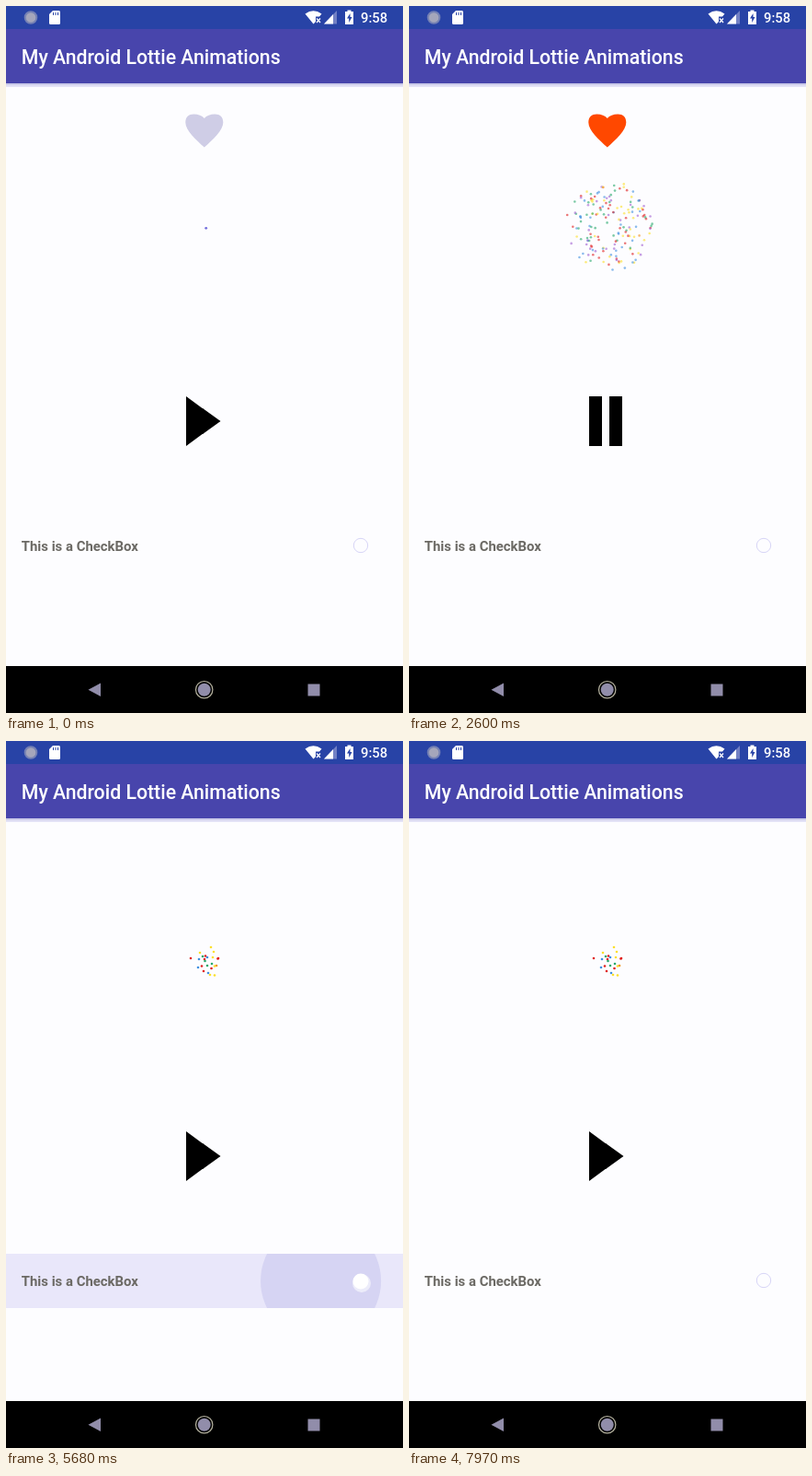
These frames come from a looping animation (432 by 768 pixels, 8930 ms). An HTML page with a canvas:

```html
<!DOCTYPE html>
<html lang="en">
<head>
<meta charset="utf-8">
<title>Lottie animations</title>
<style>
html, body { margin: 0; width: 100%; height: 100%; overflow: hidden; background: #fdfdff; }
canvas, svg { position: absolute; left: 0; top: 0; width: 432px; height: 768px; }
text { font-family: Roboto, sans-serif; font-weight: 500; fill: #fff; }
</style>
</head>
<body>
<canvas id="stage" width="432" height="768"></canvas>
<svg viewBox="0 0 432 768">
  <rect width="432" height="26" fill="#2843a6"/>
  <rect y="25" width="432" height="59" fill="#4845ac"/>
  <rect y="84" width="432" height="2" fill="#cccbea"/>
  <rect y="86" width="432" height="2" fill="#e3e2f6"/>
  <text x="16.8" y="63" font-size="21.25">My Android Lottie Animations</text>
  <text x="386" y="18" font-size="14.8">9:58</text>
  <text x="16.8" y="592" font-size="14.9" style="font-weight:700;fill:#6b6964">This is a CheckBox</text>

  <!-- status icons -->
  <circle cx="27" cy="12.5" r="6.3" fill="#a5a6bb" stroke="#7581b4" stroke-width="2"/>
  <path d="M51 5H57.500Q59 5 59 6.500V18.500Q59 20 57.500 20H48.500Q47 20 47 18.500V9Z" fill="#fff"/>
  <path d="M51.500 7v3M54 7v3M56.500 7v3" stroke="#2843a6"/>
  <path d="M325.500 8.500Q334.500 2 343.500 8.500L341 11.500H337V17L334.500 19.500Z" fill="#fff"/>
  <path d="M338 13.500l4 4.500m0-4.500l-4 4.500" stroke="#fff" stroke-width="1.300"/>
  <path d="M360 5V19.500H346Z" fill="#7381c4"/>
  <path d="M356 9V19.500H346Z" fill="#fff"/>
  <path d="M371.500 6V4.500h4V6H378V20H369V6Z" fill="#fff"/>
  <path d="M374.500 8l-3.500 5.500h2.200V18l3.300-6h-2Z" fill="#2843a6"/>

  <!-- navigation bar -->
  <rect y="717" width="432" height="51" fill="#000"/>
  <g fill="#918daa">
    <path d="M89.500 742.800L103 735.500V750Z"/>
    <circle cx="215.700" cy="742.700" r="7"/>
    <circle cx="215.700" cy="742.700" r="9.200" fill="none" stroke="#b5b29f" stroke-width="1.200"/>
    <rect x="328.500" y="736.500" width="13" height="13"/>
  </g>
</svg>
<script>
const LOOP = 8930, START = 455, STOP = 4010, CYCLE = 1075;
const g = document.getElementById('stage').getContext('2d');
const seg = (t, a, b) => Math.min(1, Math.max(0, (t - a) / (b - a)));
const smooth = x => x * x * (3 - 2 * x);
const mix = (a, b, x) => a + (b - a) * x;

let seed = 7;
const rnd = () => (seed = seed * 16807 % 2147483647) / 2147483647;

function disc(x, y, r, color, alpha = 1) {
  g.globalAlpha = alpha;
  g.fillStyle = color;
  g.beginPath();
  g.arc(x, y, Math.max(0, r), 0, 7);
  g.fill();
  g.globalAlpha = 1;
}

// Play / pause button: the two halves of the triangle become bars
const halves = [
  [[196, 424, 196, 424], [215, 438, 210, 424], [215, 464, 210, 478], [196, 478, 196, 478]],
  [[214, 437, 218, 424], [233.5, 451, 232, 424], [233.5, 451, 232, 478], [214, 465, 218, 478]]
];
function button(k) {
  g.fillStyle = '#000';
  for (const half of halves) {
    g.beginPath();
    for (const [x, y, u, v] of half) g.lineTo(mix(x, u, k), mix(y, v, k));
    g.fill();
  }
}

// Heart
const heartPath = new Path2D('M0 17.5C-9 9.500-20.500-1-20.500-9.500C-20.500-15.500-17-18.500-11.500-18.500' +
  'C-6.500-18.500-2.500-17 0-14C2.500-17 6.500-18.500 11.500-18.500C17-18.500 20.500-15.500 20.500-9.500C20.500-1 9 9.500 0 17.500Z');
function heartShape(scale, color) {
  if (scale <= 0) return;
  g.save();
  g.translate(215.8, 136);
  g.scale(scale, scale);
  g.fillStyle = color;
  g.fill(heartPath);
  g.restore();
}
const sparks = ['#ff8a70', '#f59ad0', '#c9a0f0', '#ffb070'];
function heart(p) {
  heartShape(1 - seg(p, 0, 130), '#cfcde6');
  if (p > 335 && p < 850) {
    const out = 1 - (1 - seg(p, 360, 800)) ** 2;
    const alpha = .55 * seg(p, 335, 355) * (1 - seg(p, 650, 850));
    for (let i = 0; i < 10; i++) {
      const a = i * Math.PI / 5, r = mix(7, 38, out);
      disc(215.8 + r * Math.sin(a), 136.5 - r * Math.cos(a), mix(1, 2, out), sparks[i % 4], alpha);
    }
  }
  const k = seg(p, 440, 800);
  heartShape(k < 1 ? smooth(k) + .3 * Math.sin(Math.PI * k) * k : 1, '#ff4800');
}

// Confetti: an early handful, then a seeded burst
const hues = { r: '#e0201f', y: '#fbe02a', b: '#3f8fe0', g: '#27a86b', p: '#a05fd0' };
const early = ('-16,-5,r 14,-5,r 13.500,-4.500,r 6,-17,y 9,-12,y -6,-11,y -3,-7,g 0,-7.500,r -7,-4,b ' +
  '-1,-4,r -.5,-2,g -8,5,b -4,3.500,r 2,3,g -2,9,r 6.500,6,r 7,1,g 12,3,o 10,3.500,y 3,11,b ' +
  '5,13,y 10,13.500,y 8,-6,y 2,-6,b').split(' ').map(s => {
    const [x, y, c] = s.split(',');
    return { x: +x * 2.8, y: +y * 2.8, color: hues[c] || '#f0901c', delay: 280 };
  });
const later = Array.from({ length: 150 }, (_, i) => {
  const a = rnd() * Math.PI * 2, r = mix(12, 48, rnd() ** .8);
  return { x: r * Math.cos(a), y: r * Math.sin(a), color: hues['rybgp'[i % 5]], delay: 331 + i * .6 };
});
const bits = early.concat(later);
function confetti(p) {
  if (p < 280) return disc(217.7, 241.3, 1.4, '#7470dd');
  const alpha = mix(1, .6, seg(p, 600, 1050));
  for (const b of bits) {
    if (p <= b.delay) continue;
    const e = 1 - (1 - seg(p, b.delay, CYCLE)) ** 6.8;
    disc(217 + b.x * e, 241 + b.y * e, 1.3, b.color, alpha);
  }
}

// Touch feedback on the checkbox row
function ripple(a) {
  if (a <= 0 || a >= 760) return;
  const fade = seg(a, 0, 90) * (1 - seg(a, 430, 760));
  const f = Math.min(1, a * .00097 + .6 * seg(a, 350, 650));
  g.save();
  g.beginPath();
  g.rect(0, 557, 432, 59);
  g.clip();
  g.globalAlpha = fade;
  g.fillStyle = '#e9e7fa';
  g.fillRect(0, 557, 432, 59);
  disc(mix(397, 216, f), 586.5, 218 * f, '#d6d4f3', fade);
  g.restore();
}

function checkbox(k) {
  const x = 386, y = 586;
  if (k > 0 && k < 1) {
    disc(x + 1, y + 3, 10, '#fff', .55 * (1 - seg(k, .3, .6)));
    disc(x, y + 1, 8.5, '#fff');
  }
  if (k === 0) {
    g.strokeStyle = '#d6d4f6';
    g.lineWidth = 1;
    g.beginPath();
    g.arc(x, y, 7.7, 0, 7);
    g.stroke();
  }
  if (k > .15) disc(x, y, 8.2 * smooth(seg(k, .15, .65)), '#00c763');
  const c = seg(k, .6, 1);
  if (c > 0) {
    const a = seg(c, 0, .4), b = seg(c, .4, 1);
    g.strokeStyle = '#fff';
    g.lineWidth = 1.5;
    g.beginPath();
    g.moveTo(x - 4, y);
    g.lineTo(x - 4 + 2.7 * a, y + 2.7 * a);
    if (b > 0) g.lineTo(x - 1.3 + 5.3 * b, y + 2.7 - 5.4 * b);
    g.stroke();
  }
}

function draw(t) {
  const p = t < START ? 0 : (Math.min(t, STOP) - START) % CYCLE;
  g.clearRect(0, 0, 432, 768);
  heart(p);
  confetti(p);
  button(smooth(seg(t, 50, 430)) - smooth(seg(t, 3640, STOP)));
  ripple(t - 5370);
  ripple(t - 7180);
  checkbox(seg(t, 5650, 6210) - seg(t, 7460, 7970));
}

let begin;
function tick(now) {
  begin ??= now;
  draw((now - begin) % LOOP);
  requestAnimationFrame(tick);
}
draw(0);
requestAnimationFrame(tick);
</script>
</body>
</html>
```
